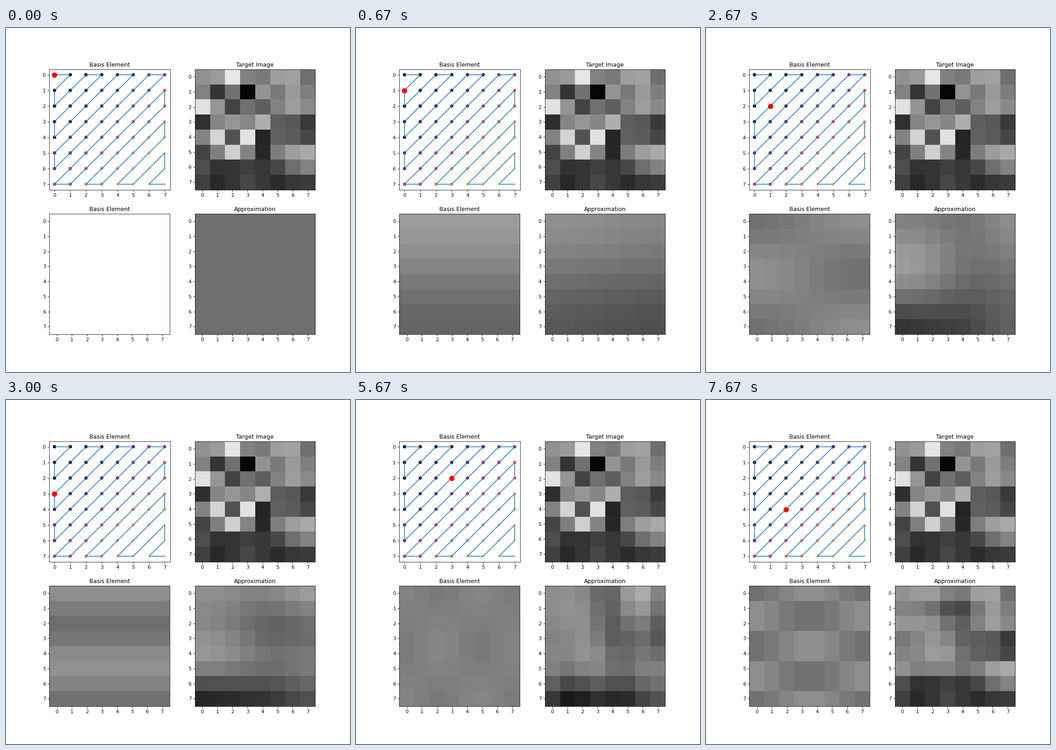
These frames come from a looping animation (748 by 748 pixels, 8000 ms). A matplotlib script:

```python
import numpy as np
import matplotlib.pyplot as plt
from matplotlib.animation import FuncAnimation

N = 8
TICKS = 80
TICK_MS = 100

# Strength of each cosine pattern, in zigzag order.
STRENGTHS = [111, 4.5, 28.4, -14.6, 8.5, 7.7, -3.2, 2.2, -16.8, 17.9, -6.9, -3.2,
             8.4, 4.5, -5.7, 7.9, -16.2, 6, -0.9, 20.4, 0.4, 15.5, -3.8, -21.6]

# Cells (x, y) whose fine detail stands out from the smooth patterns.
BRIGHT = [(2, 0), (4, 1), (0, 2), (4, 3), (1, 4), (3, 4), (2, 5)]
DARK = [(1, 1), (3, 1), (2, 2), (0, 3), (2, 4), (4, 4), (0, 5), (4, 5)]
DETAIL = 75


def zigzag(n):
    """(u, v) pairs in zigzag order; odd diagonals run down to the left."""
    path = []
    for d in range(2 * n - 1):
        diagonal = [(u, d - u) for u in range(n) if 0 <= d - u < n]
        path += diagonal[::-1] if d % 2 else diagonal
    return path


def wave(k):
    return np.cos((2 * np.arange(N) + 1) * k * np.pi / (2 * N))


def show(ax, data, low, high):
    return ax.imshow(data, cmap="gray", vmin=low, vmax=high)


path = zigzag(N)
us, vs = zip(*path)
parts = np.array([s * np.outer(wave(v), wave(u))
                  for s, (u, v) in zip(STRENGTHS, path)])
sums = parts.cumsum(axis=0)

target = sums[-1].copy()
for cells, change in ((BRIGHT, DETAIL), (DARK, -DETAIL)):
    for x, y in cells:
        target[y, x] += change

# The constant pattern is brighter than the scale of its panel.
parts[0] += N * N

fig, axes = plt.subplots(2, 2, figsize=(10, 10), dpi=74.8)
(ax_path, ax_target), (ax_basis, ax_sum) = axes

ax_path.scatter(us, vs, c=range(N * N), cmap="magma")
ax_path.plot(us, vs)
ax_path.set_xlim(-0.35, N - 0.65)
ax_path.set_ylim(N - 0.65, -0.35)
marker = ax_path.scatter(us[:1], vs[:1], s=100, color="red", zorder=3)

show(ax_target, target, 0, 255)
basis_image = show(ax_basis, parts[0], -127.5, 127.5)
sum_image = show(ax_sum, sums[0], 0, 255)

titles = ["Basis Element", "Target Image", "Basis Element", "Approximation"]
for ax, title in zip(axes.flat, titles):
    ax.set_title(title)
    ax.set_xticks(range(N))
    ax.set_yticks(range(N))


def update(tick):
    step = (3 * tick + 2) // 10  # three steps a second
    marker.set_offsets([path[step]])
    basis_image.set_data(parts[step])
    sum_image.set_data(sums[step])
    return marker, basis_image, sum_image


anim = FuncAnimation(fig, update, frames=TICKS, interval=TICK_MS,
                     repeat=True, repeat_delay=0)
plt.show()
```
